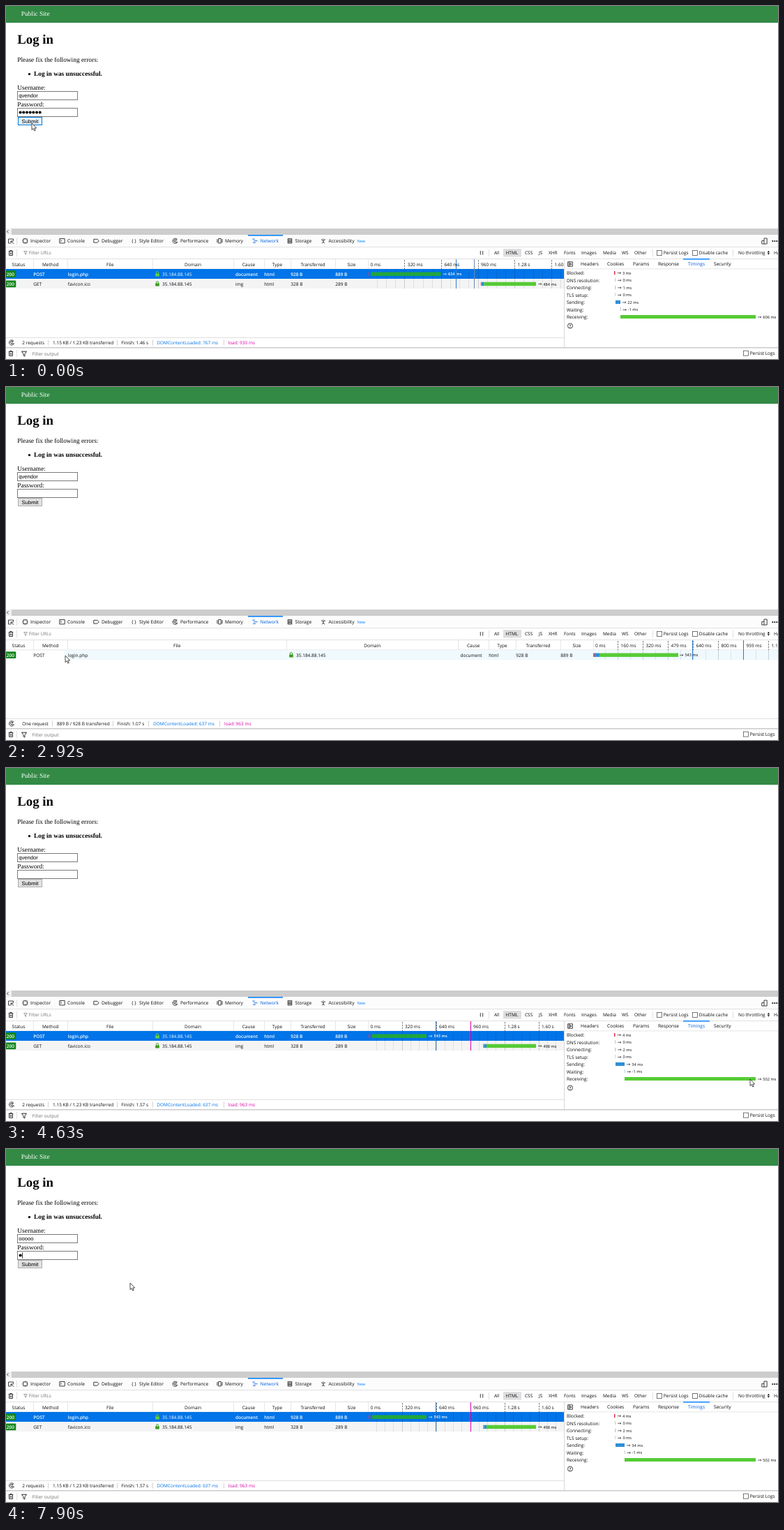
Write an HTML page that moves like this. It is 1107 px wide and 506 px high and loops after 8 s.

```html
<!DOCTYPE html>
<html lang="en">
<head>
<meta charset="utf-8">
<title>Log in</title>
<style>
html, body { margin: 0; width: 100%; height: 100%; overflow: hidden; background: #fff; }
svg { display: block; width: 1107px; height: 506px; }
text { font: 6.5px "Open Sans", "Noto Sans", sans-serif; fill: #0c0c0d; white-space: pre; text-rendering: geometricPrecision; }
.page { font: 9.38px "Liberation Serif", serif; fill: #000; }
.form { font: 7.65px "Liberation Sans", sans-serif; fill: #000; }
.tab { font-size: 6.65px; }
.note { font-size: 7.65px; fill: #38383d; }
.time { font-size: 5.65px; }
.bold { font-weight: 600; }
.mid { text-anchor: middle; }
.dim { fill: #737373; }
.icon { fill: none; stroke: #2a2a2e; stroke-width: .9; }
</style>
</head>
<body>
<svg id="stage" viewBox="0 0 1107 506"></svg>
<script>
const stage = document.getElementById('stage');
const LOOP = 8000, BLUE = '#0074e8', LINK = '#0060df', PINK = '#dd00a9';
const GREEN = '#56cb36', SEND = '#2f8fd6', RULE = '#e0e0e2', IP = '35.184.88.145';

// Markup helpers
const text = (x, y, s, cls = '', fill = '') =>
  `<text x="${x}" y="${y}" class="${cls}"${fill && ` style="fill:${fill}"`}>${s}</text>`;
const rect = (x, y, w, h, fill, more = '') =>
  `<rect x="${x}" y="${y}" width="${w}" height="${h}" fill="${fill}" ${more}/>`;
const box = (x, y, w, h, fill, stroke, more = '') => rect(x, y, w, h, fill, `stroke="${stroke}" ${more}`);
const vline = (x, y1, y2, color, more = '') =>
  `<path d="M${Math.floor(x) + .5} ${y1}V${y2}" stroke="${color}" ${more}/>`;
const icon = (x, y, d, more = '') => `<path class="icon" transform="translate(${x} ${y})" d="${d}" ${more}/>`;
const disc = (x, y, r) => `<circle class="icon" cx="${x}" cy="${y}" r="${r}"/>`;
const many = (n, f) => Array.from({ length: n }, (_, i) => f(i)).join('');

const gauge = (x, y) => icon(x, y, 'M2.6 -2.5A3.6 3.6 0 1 0 3.4 1.6H0M1.7 -.4A1.7 1.7 0 1 0 .6 1.4M0 .2L3 -2.6');
const trash = (x, y) => icon(x, y, 'M-3.3 -2.5H3.3M-1.2 -2.6V-3.6H1.2V-2.6M-2.5 -2.3V3.5H2.5V-2.3M-.8 -.8V2.2M.8 -.8V2.2');
const funnel = (x, y, scale, color) =>
  `<g transform="translate(${x} ${y}) scale(${scale})">` +
  icon(0, 0, 'M-3.2 -3H3.2L.9 .2V3.3L-.9 2.2V.2Z', `style="stroke:${color}"`) + '</g>';
const check = (x, y, s) => box(x + .5, y - 3.5, 7, 7, '#fff', '#555', 'stroke-width=".8"') + text(x + 9.7, y + 2.4, s);
const help = (x, y) => disc(x, y, 3.5) + text(x, y + 2.2, '?', 'mid time bold');
const lock = (x, y, fill) => `<path d="M${x - 1.6} ${y}V${y - 1.8}a1.6 1.6 0 0 1 3.2 0V${y}" fill="none" stroke="${fill}"/>` +
  rect(x - 2.8, y - .6, 5.6, 4, fill, 'rx=".5"');
const timing = (x, y, s, fill = '#0c0c0d') =>
  `<path d="M${x + .5} ${y - 2}h5m-1.5 -1.2l1.5 1.2l-1.5 1.2" fill="none" stroke="${fill}" stroke-width=".6"/>` +
  text(x + 7.9, y, s, fill === '#fff' ? 'time bold' : 'time', fill);

function chrome() {
  const tabs = [[35, 'Inspector'], [88, 'Console'], [137, 'Debugger'], [191, 'Style Editor'], [250, 'Performance'],
    [314, 'Memory'], [414.5, 'Storage'], [462.5, 'Accessibility']];
  const kinds = [[700, 'All'], [716.5, 'HTML'], [744, 'CSS'], [764, 'JS'], [778, 'XHR'], [800, 'Fonts'],
    [825, 'Images'], [856, 'Media'], [883, 'WS'], [901, 'Other']];
  return rect(0, 0, 1107, 24, '#328a45') + text(21.7, 13.5, 'Public Site', 'page', '#fff') +
    `<text x="16.3" y="54" class="page" style="font-size:18.8px;font-weight:700">Log in</text>` +
    text(16.3, 80, 'Please fix the following errors:', 'page') +
    '<circle cx="33.5" cy="97.6" r="1.7"/>' +
    `<text x="40" y="100" class="page" style="font-weight:700">Log in was unsuccessful.</text>` +
    text(16.3, 120, 'Username:', 'page') + text(16.3, 143.5, 'Password:', 'page') +
    rect(0, 319, 1107, 9, '#f0f0f0') + rect(8, 319, 1099, 9, '#cdcdcd') +
    icon(2.5, 323.3, 'M1 -2L-1 0L1 2') +
    rect(0, 328, 1107, 178, '#fff') + rect(0, 328, 1107, 17, '#fcfcfd') +
    many(3, i => rect(0, [345, 362, 489][i], 1107, i > 1 ? 1.5 : 1, i > 1 ? '#cbcbcd' : RULE)) +
    rect(347, 328, 50, 1.6, '#0a84ff') + vline(15.5, 332, 342, RULE) +
    tabs.map(([x, s]) => text(x, 339.4, s, 'tab')).join('') + text(364.5, 339.4, 'Network', 'tab', LINK) +
    text(503.5, 339.4, 'New', 'time', '#0a84ff') +
    icon(7, 337, 'M-1 3H-3.5V-3H3.5V-.5M4 3.7L0 0V3.5M0 0H3.5') +
    icon(27.5, 336.7, 'M-2.8 -2.8H2.8V2.8H-2.8ZM0 -4V-2.8M0 4V2.8M-4 0H-2.8M4 0H2.8') +
    icon(80.5, 336.7, 'M-3.7 -3.2H3.7V3.2H-3.7ZM-2.4 -1.6L-.9 -.2L-2.4 1.2') +
    icon(129.5, 336.7, 'M-3.7 -2.4H1.4L3.8 0L1.4 2.4H-3.7Z') +
    text(180, 339.2, '{ }', 'tab') + gauge(242.5, 336.7) +
    icon(306.5, 336.7, 'M-1.8 -3.2H1.8V3.2H-1.8ZM-3.6 -2.5V2.5M3.6 -2.5V2.5M-2.5 -1H-1.8M2.5 1H1.8') +
    icon(357, 336.7, 'M-3.6 -2.5H0M-1.8 0H3.6M-3 2.5H1', `style="stroke:${LINK}"`) +
    icon(407, 336.7, 'M-2.8 -3.3H2.8V-1.3H-2.8ZM-2.8 -1H2.8V1H-2.8ZM-2.8 1.3H2.8V3.3H-2.8Z') +
    icon(455, 336.7, 'M-3 -1.8Q0 -.5 3 -1.8M0 -1V1L-1.7 3.6M0 1L1.7 3.6M0 -3.6V-2.7') +
    icon(1087.5, 337, 'M-.5 -4H3.7V4H-.5ZM-.5 -.5H-3.7V4H-.5') +
    many(3, i => `<circle cx="${1099.3 + i * 3}" cy="337" r="1"/>`) +
    trash(7, 354) + vline(15.5, 348, 359, RULE) + funnel(28, 353.8, .75, '#737373') +
    text(32.7, 356.3, 'Filter URLs', 'dim') +
    icon(682, 353.8, 'M-1.7 -2.8V2.8M1.7 -2.8V2.8') + vline(692.5, 349, 359, RULE) +
    rect(713, 348, 26, 11.5, '#dedee0', 'rx="1"') +
    kinds.map(([x, s]) => text(x, 356.3, s)).join('') +
    vline(927.5, 349, 359, RULE) + check(933, 354, 'Persist Logs') + check(984, 354, 'Disable cache') +
    vline(1042.5, 349, 359, RULE) + text(1050, 356.3, 'No throttling') +
    '<path d="M1091.8 353.2l1.6 -2.4l1.6 2.4zM1091.8 354.2l1.6 2.4l1.6 -2.4z"/>' + text(1101, 356.3, 'HAR') +
    rect(0, 475, 1107, 1, RULE) + gauge(8, 482.3) +
    trash(7, 498) + vline(15.5, 493, 503, RULE) + funnel(26, 498.5, 1.1, '#2a2a2e') +
    text(37.5, 500.5, 'Filter output', 'tab dim') + check(1057, 497.7, 'Persist Logs');
}

// Network table
const WIDE = [0, 39, 88.5, 402, 648.5, 692, 731, 795, 842];
const SLIM = [0, 39, 88.5, 210, 326, 370, 408, 472, 519];
const HEADS = ['Status', 'Method', 'File', 'Domain', 'Cause', 'Type', 'Transferred', 'Size'];
const POST = ['POST', 'login.php', IP, 'document', 'html', '928 B', '889 B'];
const ICO = ['GET', 'favicon.ico', IP, 'img', 'html', '328 B', '289 B'];

const head = c => rect(0, 363, 1107, 14, '#fff') + rect(0, 376.5, 1107, .8, RULE) +
  HEADS.map((s, i) => text((c[i] + c[i + 1]) / 2 - (i ? 0 : 1.5), 373.2, s, 'mid') +
    vline(c[i + 1], 363, 377, RULE, 'stroke-width=".8"')).join('');

function row(c, i, cells, { back, ink, done = true } = {}) {
  const y = 386.5 + i * 14.2, x = c === WIDE ? 84 : 0, end = c === WIDE ? 1107 : 800;
  return (back ? rect(x, 377 + i * 14, end - x, 14, back) : '') +
    (done ? rect(0, y - 7.3, 14.3, 9.8, '#12861b', 'rx="1"') + text(.8, y, '200', 'bold', '#fff') : '') +
    lock(c[3] + 7, y - 2.5, ink ? '#62d040' : '#3a9c1c') +
    cells.map((s, k) =>
      text(c[k + 1] + (k === 2 ? 14 : k === 3 ? 3 : .3), y, s, ink && k !== 2 ? 'bold' : '', ink)).join('');
}

function axis(x0, step, sub, labels, bottom) {
  return labels.split('|').map((s, k) => text(x0 + k * step + (k ? 4 : 3.5), 373.2, s) +
    (k ? vline(x0 + k * step, 364, 377, '#555', 'stroke-width=".8" stroke-dasharray="2.4 1.4"') : '')).join('') +
    many(Math.floor(281 / step * sub), i =>
      vline(x0 + (i + 1) * step / sub, 377, bottom, '#000', `stroke-width=".8" opacity="${(i + 1) % sub ? .1 : .2}"`));
}

const bars = (i, list) => list.map(([x, end, fill]) => rect(x, 381.5 + i * 14.2, end - x, 5.4, fill)).join('');

const foot = items => items.map(([x, s, fill], i) =>
  text(x, 484.8, s, '', fill) + (i ? vline(x - 6.3, 478.5, 486.5, '#d0d0d2') : '')).join('');

function panel(split, values, ready = true) {
  const names = ['Blocked', 'DNS resolution', 'Connecting', 'TLS setup', 'Sending', 'Waiting', 'Receiving'];
  const tabs = [[824, 'Headers'], [862, 'Cookies'], [899, 'Params'], [935, 'Response'], [1015, 'Security']];
  const spans = [[872, 1.5, '#e0304a'], [873.4, .7, '#c9a08c'], [873.4, .9, '#d99a6a'], [873.4, .7, '#c9b8b8'],
    [874, split - 874, SEND], [split - .2, .7, '#9ab0c8'], [split, 1075 - split, GREEN]];
  return rect(800, 363, 307, 126, '#fff') + vline(800.5, 363, 489, '#d7d7db') + rect(800, 376.5, 307, .8, RULE) +
    icon(809, 370, 'M-3.4 -3.2H3.4V3.2H-3.4ZM-1.4 -3.2V3.2M.1 -1.5L2 0L.1 1.5Z') +
    tabs.map(([x, s]) => text(x, 372.4, s, 'tab')).join('') +
    rect(971, 362, 38, 1.5, '#0a84ff') + text(978, 372.4, 'Timings', 'tab', LINK) +
    (ready ? names.map((s, i) => {
      const y = 385 + i * 10.55, [x, w, fill] = spans[i];
      return text(804, y, s + ':') + rect(x, Math.round(y - 5.3), w, 5, fill) +
        timing(Math.max(x + w + 2.4, 876), y - .3, values[i] + ' ms');
    }).join('') + help(809, 458.5) : '');
}

function pair(o) {
  const [post, ico] = o.ms;
  return head(SLIM) + row(SLIM, 0, POST, { back: BLUE, ink: '#fff' }) + row(SLIM, 1, ICO, { back: '#f4f4f5' }) +
    axis(519, o.step, o.sub, o.labels, 405) +
    bars(0, [[519, o.from - 2, '#5060b8'], [o.from, o.to, '#20a63c']]) + timing(o.to + 2.5, 386.3, post, '#fff') +
    (o.ico ? bars(1, [[o.ico, o.ico + 1.3, '#e08060'], [o.ico + 1.3, o.ico + 5, SEND], [o.ico + 5, 760, GREEN]]) : '') +
    timing(762.5, 400.5, ico) +
    vline(o.dcl[0], 363, 405, '#2f7fd0') + vline(o.load[0], 363, 405, o.load[1]) +
    foot([[23.3, '2 requests'], [67, '1.15 KB / 1.23 KB transferred'], [165.3, 'Finish: ' + o.finish],
      [216.3, `DOMContentLoaded: ${o.dcl[1]} ms`, BLUE], [318.5, `load: ${o.load[2]} ms`, PINK]]);
}

const LONG = '0 ms|320 ms|640 ms|960 ms|1.28 s|1.60 s';
const SHORT = '0 ms|160 ms|320 ms|479 ms|640 ms|800 ms|959 ms|1.12 s';

const empty = head(WIDE) + text(981, 373.2, 'Timeline', 'mid') +
  text(4, 396.3, '•', 'note') + text(10.3, 396.3, 'Perform a request or', 'note') +
  box(87.5, 385.5, 31, 16, '#fff', '#ececee') + text(91, 396.3, 'Reload', 'note') +
  text(121.5, 396.3, 'the page to see detailed information about network activity.', 'note') +
  text(4, 422.2, '•', 'note') + text(10.3, 422.2, 'Click on the', 'note') +
  box(56.5, 411.5, 19, 16, '#fff', '#ececee') + gauge(66, 419.5) +
  text(78.8, 422.2, 'button to start performance analysis.', 'note') + help(219.3, 419.7) +
  foot([[23.3, 'No requests']]);
const pending = head(WIDE) + text(981, 373.2, 'Timeline', 'mid') + row(WIDE, 0, POST.slice(0, 4), { done: false }) +
  foot([[23.3, 'One request']]);
const single = loaded => head(WIDE) + row(WIDE, 0, POST, { back: loaded && '#f0f9fe' }) +
  axis(841.5, 36, 2, SHORT, 391) +
  bars(0, [[842, 844, '#e0506a'], [844, 851, SEND], [851, 964, GREEN]]) + timing(965.5, 386.3, '543 ms') +
  vline(984.5, 363, 391, '#2f7fd0') + (loaded ? vline(1057.5, 363, 391, PINK, 'opacity=".8"') : '') +
  foot([[23.3, 'One request'], [73, '889 B / 928 B transferred'], [159.5, 'Finish: 1.07 s'],
    [211, 'DOMContentLoaded: 637 ms', BLUE], ...(loaded ? [[313, 'load: 963 ms', PINK]] : [])]);
const status = rect(0, 318, 152, 10, '#f9f9fa') + vline(152, 318, 328, '#c8c8c8', 'stroke-width=".7"') +
  text(.2, 325.3, `Sending request to ${IP}...`);

const before = pair({ step: 52.7, sub: 4, labels: LONG, from: 523.5, to: 623.5, ico: 680.7, ms: ['634 ms', '484 ms'],
  dcl: [645.5, 767], load: [671.5, '#6f84b4', 930], finish: '1.46 s' }) + panel(881, [3, 0, 1, 0, 22, -1, 606]);
const early = pair({ step: 36, sub: 2, labels: SHORT, from: 528, to: 641, ms: ['543 ms', '498 ms'],
  dcl: [662.5, 637], load: [735.5, '#4a74a8', 963], finish: '1.07 s' });
const after = pair({ step: 49, sub: 4, labels: LONG, from: 525, to: 603, ico: 684, ms: ['543 ms', '498 ms'],
  dcl: [616.7, 637], load: [666.7, PINK, 963], finish: '1.57 s' });
const slow = [4, 0, 2, 0, 34, -1, 502];

// [markup, shown from, hidden at]
const layers = [
  [before, 0, 1470], [empty, 1470, 1640], [pending, 1640, 2100], [status, 1470, 2100],
  [single(false), 2100, 2920], [single(true), 2920, 3220],
  [early, 3220, 3490], [after, 3490, LOOP],
  [panel(887, slow, false), 3220, 3350], [panel(887, slow), 3350, LOOP]
];

stage.innerHTML = chrome() + layers.map(l => `<g class="layer">${l[0]}</g>`).join('') +
  box(16.5, 122.5, 86, 12, '#fff', '#7a7a7a', 'id="userBox"') + box(16.5, 146.5, 86, 12, '#fff', '#7a7a7a', 'id="passBox"') +
  box(17.5, 159.5, 34, 11, '#e1e1e1', '#adadad', 'id="button"') + text(22.6, 167.9, 'Submit', 'form') +
  '<clipPath id="picked"><rect id="pick" y="124" height="9.5"/></clipPath>' +
  text(18.3, 131.4, '', 'form user') +
  `<g clip-path="url(#picked)">${rect(17, 123, 84, 11, '#0078d7')}${text(18.3, 131.4, '', 'form user', '#fff')}</g>` +
  many(7, i => `<circle class="dot" cx="${20.6 + i * 4.68}" cy="152.6" r="2"/>`) +
  '<path id="caret" d="M0 -4.2V4.2" stroke="#000" stroke-width=".8"/>' +
  '<path id="arrow" d="M0 0V9.6L2.2 7.6L3.8 11L5.3 10.3L3.8 7H6.7Z" fill="#fff" stroke="#222" stroke-width=".8"/>' +
  '<path id="beam" d="M-1.8 -4.5H1.8M0 -4.5V4.5M-1.8 4.5H1.8" stroke="#222" stroke-width=".8"/>';

const $ = id => document.getElementById(id);
const groups = [...document.querySelectorAll('.layer')], dots = [...document.querySelectorAll('.dot')];
const users = [...document.querySelectorAll('.user')];
const show = (el, on) => el.setAttribute('visibility', on ? 'visible' : 'hidden');
const place = (el, x, y) => el.setAttribute('transform', `translate(${x} ${y})`);

const bursts = [[150, 150, 1], [500, 1190, 6], [1470, 1810, 3], [2100, 2640, 5], [2920, 2920, 1],
  [3220, 4180, 8], [4330, 5300, 8], [5440, 6390, 8], [6510, 7480, 8], [7630, 7900, 3]];
const steps = bursts.flatMap(([a, b, n]) => Array.from({ length: n }, (_, i) => a + (b - a) * i / Math.max(n - 1, 1)));
const snap = t => steps.reduce((s, u) => u <= t + .5 ? u : s, 0);

const path = [[0, 37, 168], [150, 36.6, 167.4], [500, 38, 166], [776, 44, 152], [914, 45, 152], [1190, 40, 163],
  [2100, 40, 163], [2640, 88, 374], [2920, 85, 385], [3500, 85, 385], [3769, 250, 450], [3906, 540, 482],
  [4180, 985, 458], [4460, 1067, 446], [4750, 1067, 446], [5300, 132, 201], [5576, 100, 164], [5846, 69, 134],
  [6118, 32, 129], [6390, 4, 129], [7060, 12, 135], [7340, 58, 160], [7480, 62, 152], [7630, 115, 172],
  [7765, 178, 192], [LOOP, 178, 192]];

function pointer(t) {
  const i = Math.max(1, path.findIndex(p => p[0] >= t));
  const [a, x, y] = path[i - 1], [b, u, v] = path[i], k = (t - a) / (b - a);
  return [x + (u - x) * k, y + (v - y) * k];
}

function draw(t) {
  const s = snap(t), [x, y] = pointer(s);
  groups.forEach((g, i) => show(g, t >= layers[i][1] && t < layers[i][2]));

  const typing = s >= 6510, inField = top => x > 16 && x < 103 && y > top && y < top + 13;
  const dragging = s > 5850 && !typing;
  const name = typing ? 'ooooo'.slice(0, 1 + Math.floor((s - 6509) / 138)) : 'qvendor';
  users.forEach(u => u.textContent = name);
  const end = 18.3 + users[0].getComputedTextLength();
  const left = Math.min(end, Math.max(18, x));
  $('pick').setAttribute('x', left);
  $('pick').setAttribute('width', dragging ? end - left : 0);

  const userOn = inField(122) || (s > 5850 && s < 7479);
  $('userBox').setAttribute('stroke', userOn ? '#171717' : '#7a7a7a');
  $('passBox').setAttribute('stroke', inField(146) ? '#171717' : '#7a7a7a');
  $('button').setAttribute('stroke', s < 2100 ? '#0078d7' : '#adadad');
  $('button').setAttribute('fill', s < 2100 ? '#e5f1fb' : '#e1e1e1');

  const count = s < 2100 ? 7 : s < 7899 ? 0 : 1;
  dots.forEach((d, i) => show(d, i < count));
  const inPass = s >= 7479;
  show($('caret'), typing);
  place($('caret'), inPass ? 18.6 + count * 4.9 : end + .4, inPass ? 152.5 : 128.6);

  const hidden = typing && s < 7070, beam = dragging || inField(122) || inField(146);
  show($('beam'), beam && !hidden);
  show($('arrow'), !beam && !hidden);
  place($(beam ? 'beam' : 'arrow'), x, y);
}

const start = performance.now();
(function tick() {
  draw((performance.now() - start) % LOOP);
  requestAnimationFrame(tick);
})();
</script>
</body>
</html>
```
